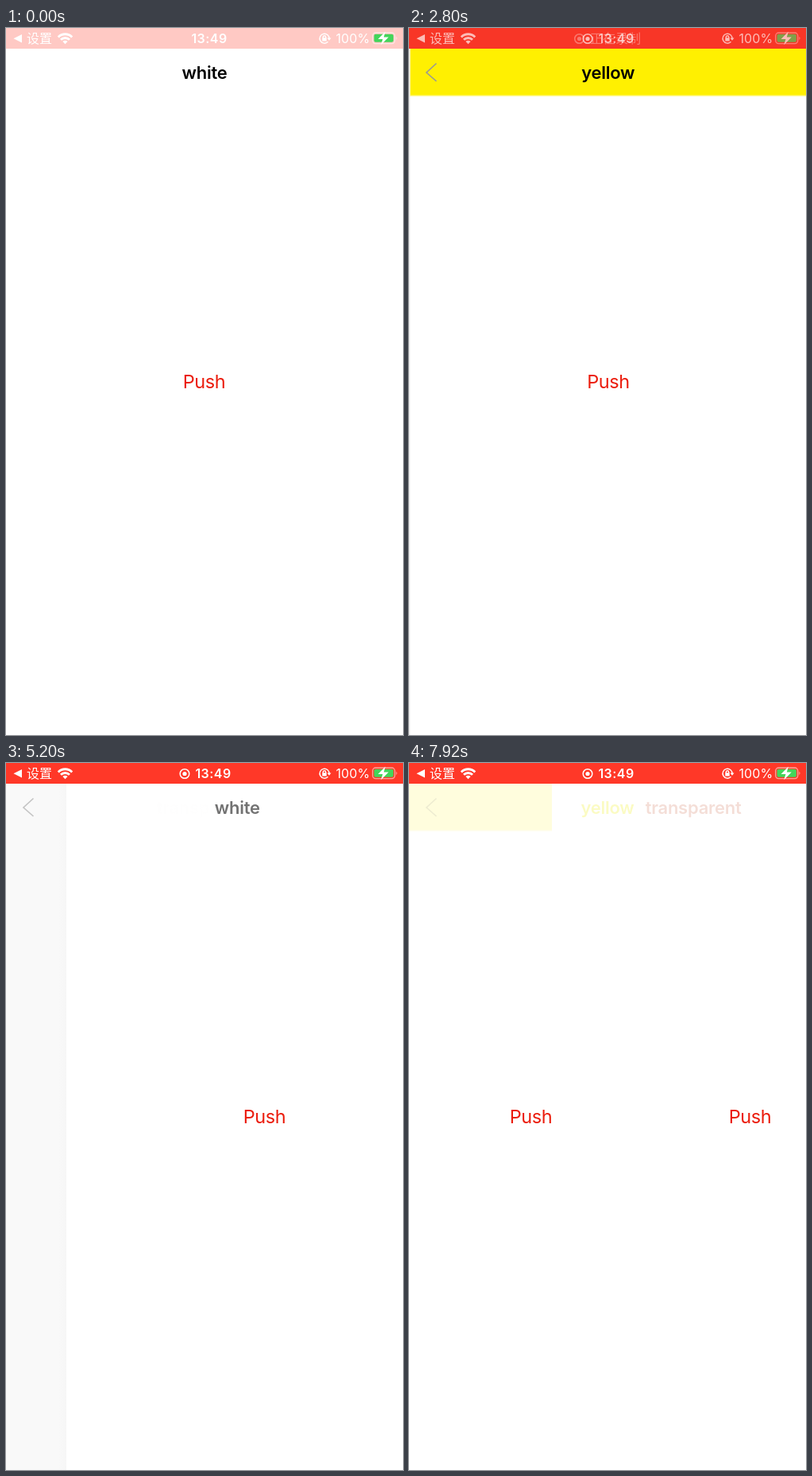
These frames come from a looping animation (500x889 px, 8 s). An HTML page:

```html
<!DOCTYPE html>
<html lang="en">
<head>
<meta charset="utf-8">
<title>Navigation bar transitions</title>
<style>
  html, body { margin: 0; width: 100%; height: 100%; overflow: hidden; background: #fff; }
  svg { display: block; width: 100vw; height: 100vh; }
  text { font-family: Inter, Roboto, sans-serif; }
  .title { font-size: 22px; font-weight: 600; letter-spacing: -.25px; text-anchor: middle; }
  .push { font-size: 23.5px; letter-spacing: -.4px; text-anchor: middle; fill: #eb1c0c; }
  .cjk { font-family: "Noto Sans CJK SC", "Noto Sans CJK", sans-serif; font-size: 16px; }
  .clock { font-size: 16px; font-weight: 600; letter-spacing: .45px; text-anchor: middle; }
</style>
</head>
<body>
<svg viewBox="0 0 500 889">
  <defs>
    <linearGradient id="edge">
      <stop offset="0" stop-opacity="0"/>
      <stop offset="1" stop-opacity=".025"/>
    </linearGradient>
    <g id="dot">
      <circle r="5.8" fill="none" stroke="#fff" stroke-width="1.5"/>
      <circle r="2.6" fill="#fff"/>
    </g>
  </defs>
  <rect width="500" height="889" fill="#fff"/>

  <g id="under"></g>
  <rect id="dim" y="26" width="500" height="863"/>
  <rect id="shadow" y="26" width="11" height="863" fill="url(#edge)"/>
  <g id="top"></g>

  <text id="underTitle" class="title" y="64"></text>
  <text id="topTitle" class="title" y="64"></text>
  <path id="chevron" d="M34.5 44.5 22 56 34.5 67" fill="none" stroke="#989898" stroke-width="1.6"/>

  <rect id="status" width="500" height="26"/>
  <g id="normal" fill="#fff">
    <path d="M9.5 13.3 20 8v10.6z"/>
    <text class="cjk" x="26" y="19">设置</text>
    <g fill="none" stroke="#fff" stroke-width="2.9">
      <path d="M65.8 11.4a12.2 12.2 0 0 1 17.4 0"/>
      <path d="M69 14.7a7.8 7.8 0 0 1 11 0"/>
    </g>
    <path d="M71.4 17a4.4 4.4 0 0 1 6.200 0L74.500 20.300z"/>
    <use id="clockDot" href="#dot" x="225" y="13.500"/>
    <text id="clock" class="clock" y="19">13:49</text>
    <g fill="none" stroke="#fff" stroke-width="1.400">
      <path d="M405.500 17.300a6 6 0 1 1 1.600-3.600"/>
      <path d="M399.300 12.700v-1.200a1.700 1.700 0 0 1 3.400 0v1.200"/>
    </g>
    <path d="M404.500 12.500h5l-2.500 3.200zM398.300 12.300h5.400v4.200h-5.400z"/>
    <text x="415.500" y="19" font-size="16" letter-spacing=".1">100%</text>
    <rect x="461.700" y="6" width="28" height="13.600" rx="3.800" fill="none" stroke="#fff" stroke-opacity=".55" stroke-width="1.300"/>
    <path d="M491.400 10.700q2.200 2 0 4.400z" opacity=".55"/>
    <rect x="463.500" y="7.800" width="24.400" height="10" rx="2" fill="#43d55a"/>
    <path d="M477.800 4.500 468.500 14h6l-2.300 7.200 9.600-9.700h-6z"/>
  </g>
  <g id="recording" fill="#fff">
    <use href="#dot" x="214.500" y="13.500"/>
    <text class="cjk" x="228" y="19">正在录制</text>
  </g>
</svg>

<script>
const LOOP = 8000, STEP = 80, WIDTH = 500;
const $ = id => document.getElementById(id);
const clamp = v => Math.max(0, Math.min(1, v));
const set = (el, attrs) => { for (const k in attrs) el.setAttribute(k, attrs[k]); };

const pages = {
  root:   { title: 'white', tint: '#f3dfda', root: true },
  red:    { title: 'red', tint: '#f3dfda', bar: '#1effff' },
  yellow: { title: 'yellow', tint: '#eeee00', bar: '#fff000' },
  clear:  { title: 'transparent', tint: '#f3dad3' },
  white:  { title: 'white', tint: '#f3dfda' }
};

// Piecewise linear value from [time, value] points.
function track(points, t) {
  if (t <= points[0][0]) return points[0][1];
  for (let i = 1; i < points.length; i++) {
    const [t0, a] = points[i - 1], [t1, b] = points[i];
    if (t <= t1) return a + (b - a) * (t - t0) / (t1 - t0);
  }
  return points[points.length - 1][1];
}

// Remaining distance of a critically damped push, 1 to 0.
function spring(ms) {
  const x = ms * .0166, u = (1 + x) * Math.exp(-x);
  return u < .002 ? 0 : u;
}

// Start, lower page, upper page, and drag points; without points it is a push.
const scenes = [
  [0, null, 'root', [[0, 0]]],
  [1400, 'root', 'red'],
  [2320, 'red', 'yellow'],
  [3120, 'yellow', 'clear'],
  [3920, 'clear', 'white'],
  [4800, 'clear', 'white', [[4840, 0], [5200, .152], [6240, .59], [6320, .8], [6400, .95], [6480, 1]]],
  [6500, 'yellow', 'clear', [[7200, 0], [7920, .36], [8000, .41]]]
];
const taps = scenes.filter(s => !s[3]).map(s => s[0]);

const pulse = [[0, 1], [800, .3], [1200, 0], [2240, .5], [3440, .9], [5200, 1], [6240, 0], [7200, .8], [7920, 1]];
const glow = (a, b, k) => Math.round(a + (b - a) * k);

for (const id of ['under', 'top']) {
  $(id).innerHTML = `<rect y="26" width="500" height="863" fill="#fff"/>
    <g class="bar"><rect y="26" width="500" height="60"/>
    <rect y="84.500" width="500" height="1.500" fill="#fff" fill-opacity=".6"/></g>
    <text class="push" x="249.500" y="453">Push</text>`;
}

function drawPage(id, page, x, barAlpha, pushAlpha) {
  const g = $(id), bar = g.querySelector('.bar');
  set(g, { transform: `translate(${x} 0)`, visibility: page ? 'visible' : 'hidden' });
  if (!page) return;
  set(bar, { opacity: page.bar ? barAlpha : 0 });
  set(bar.firstElementChild, { fill: page.bar || '#fff' });
  set(g.querySelector('.push'), { opacity: pushAlpha });
}

function drawTitle(id, page, x, alpha) {
  const el = $(id), faint = alpha < .3;
  el.textContent = page ? page.title : '';
  set(el, {
    x,
    fill: page && faint ? page.tint : '#000',
    opacity: faint ? clamp(alpha * 5) : alpha
  });
}

function drawStatus(t) {
  const k = track(pulse, t);
  const fade = track([[0, .27], [400, 1]], t);
  set($('status'), {
    fill: `rgb(${glow(233, 255, k)},${glow(51, 56, k)},${glow(36, 40, k)})`,
    opacity: fade
  });
  const label = track([[480, 0], [720, 1], [2640, 1], [2880, 0]], t);
  const dotted = t > 1500;
  set($('recording'), { opacity: label });
  set($('normal'), { opacity: 1 - label });
  set($('clockDot'), { visibility: dotted ? 'visible' : 'hidden' });
  set($('clock'), { x: dotted ? 261 : 256 });
}

function draw(t) {
  const [start, low, high, drag] = scenes.filter(s => s[0] <= t).pop();
  const under = pages[low], top = pages[high];
  const u = drag ? track(drag, t) : spring(t - start);
  const edge = u * WIDTH;

  const tap = taps.find(s => t >= s - 80 && t < s + 240);
  const pressed = tap === undefined ? 1 : track([[tap - 80, .3], [tap, .3], [tap + 240, 1]], t);

  drawPage('under', under, -150 * (1 - u), u * u, t >= start && !drag ? pressed : 1);
  drawPage('top', top, edge, (1 - u) ** 2, tap > t ? pressed : 1);

  const dim = under ? clamp(1 - u / .3) : 0;
  set($('dim'), { width: edge, opacity: dim * .05 });
  set($('shadow'), { x: edge - 11, opacity: dim });

  const topAlpha = clamp((1 - u) ** 4 * 1.06);
  const underAlpha = u ** 3;
  drawTitle('underTitle', under, 250, underAlpha);
  drawTitle('topTitle', top, 250 + edge * (.5 + .28 * u), topAlpha);
  const back = (page, a) => page && !page.root ? a : 0;
  set($('chevron'), { opacity: Math.max(back(under, underAlpha), back(top, topAlpha)) });

  drawStatus(t);
}

const begin = performance.now();
function tick() {
  const t = (performance.now() - begin) % LOOP;
  draw(Math.floor(t / STEP) * STEP);
  requestAnimationFrame(tick);
}
tick();
</script>
</body>
</html>
```
